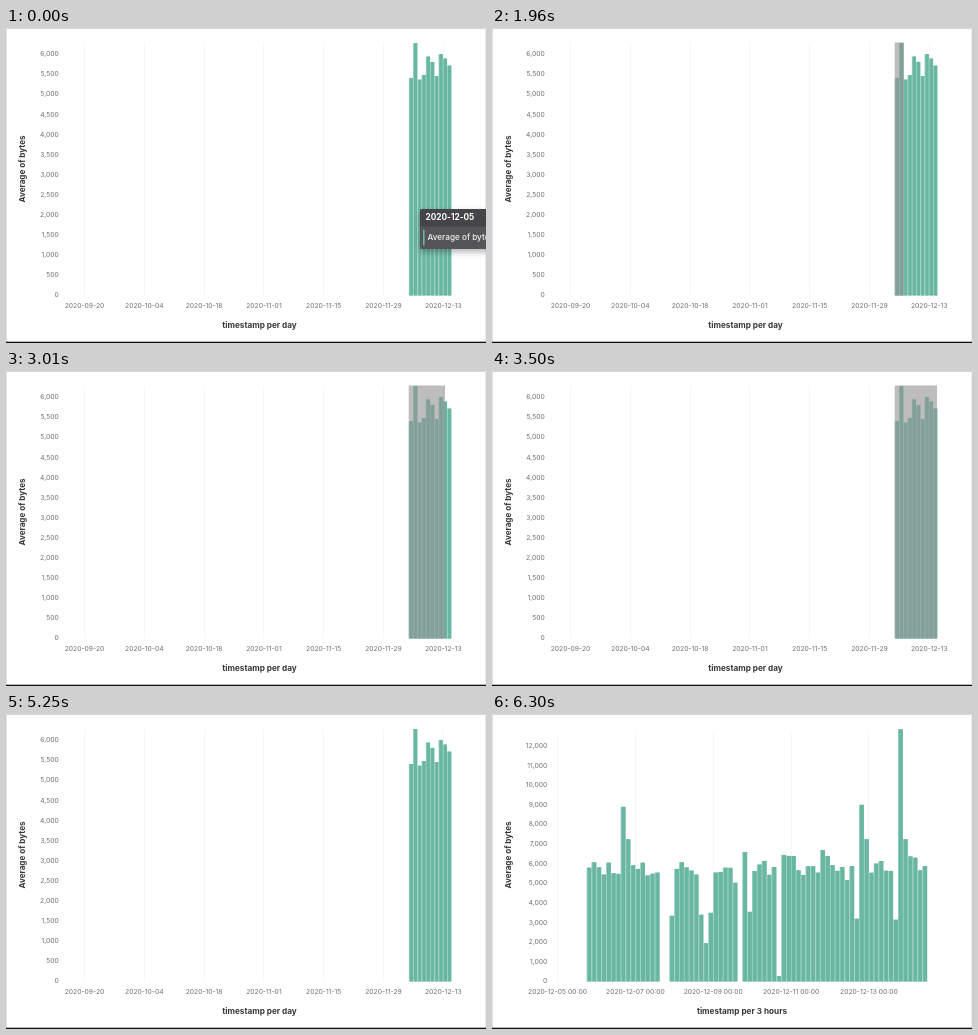
These frames come from a looping animation (480x315 px, 7.42 s). An HTML page with a canvas:

```html
<!DOCTYPE html>
<html lang="en">
<head>
<meta charset="utf-8">
<title>Zooming a bar chart</title>
<style>
html, body { margin: 0; width: 100%; height: 100%; overflow: hidden; background: #fff; }
canvas { display: block; width: 480px; height: 315px; }
</style>
</head>
<body>
<canvas id="chart"></canvas>
<script>
const W = 480, H = 315, LOOP = 7420, TICK = 70, BASE = 267.5;
const BRUSH_START = 1610, BRUSH_END = 5250, LOADING = 5810, ZOOM = 6090;
const FONT = 'Inter, "Open Sans", sans-serif';
const GREEN = '#6ab7a1', EDGE = '#98cfc0', LABEL = '#707070', TITLE = '#383838';

const canvas = document.getElementById('chart');
const ctx = canvas.getContext('2d');
const scale = window.devicePixelRatio || 1;
canvas.width = W * scale;
canvas.height = H * scale;
ctx.scale(scale, scale);

function seeded(seed) {
  return () => (seed = (seed * 16807) % 2147483647) / 2147483647;
}

function dates(from, days, count, suffix = '') {
  return Array.from({ length: count }, (_, i) => {
    const day = new Date(Date.parse(from) + i * days * 864e5);
    return day.toISOString().slice(0, 10) + suffix;
  });
}

// Traffic sags through each day of eight bars, apart from gaps, lulls and peaks.
function threeHourly() {
  const random = seeded(11);
  const events = {
    7: 8900, 15: 0, 16: 0, 17: 3350, 23: 3400, 24: 1950, 25: 3500, 31: 0,
    33: 3550, 39: 280, 55: 3200, 56: 9000, 63: 3150, 64: 12850
  };
  const values = [];
  for (let i = 0; i < 70; i++) {
    const usual = 6250 - 130 * (i % 8) + (random() - 0.5) * 900;
    const afterPeak = values[i - 1] > 8000;
    values.push(events[i] ?? (afterPeak ? 7250 : usual));
  }
  return values;
}

const daily = {
  title: 'timestamp per day', titleX: 253.5,
  left: 402.8, pitch: 4.25,
  values: [5410, 6280, 5370, 5485, 5945, 5810, 5460, 6005, 5895, 5720],
  ticks: dates('2020-09-20', 14, 7), tickX: 78.5, tickGap: 59.8, gridTop: 15,
  labelX: 52.7, stepY: 20.1, step: 500
};
const hourly = {
  title: 'timestamp per 3 hours', titleX: 250,
  left: 94.6, pitch: 4.865,
  values: threeHourly(),
  ticks: dates('2020-12-05', 2, 5, ' 00:00'), tickX: 65.5, tickGap: 77.85, gridTop: 19,
  labelX: 55.2, stepY: 19.63, step: 1000
};

// Right edge of the selection: [time, x]
const drag = [[1540, 403], [1820, 410], [2310, 420], [3010, 439], [3220, 444], [3640, 446], [4270, 447]];

function track(keys, t) {
  const i = keys.findIndex(key => t < key[0]);
  if (i < 0) return keys[keys.length - 1][1];
  const [t0, x0] = keys[i - 1], [t1, x1] = keys[i];
  return x0 + (x1 - x0) * (t - t0) / (t1 - t0);
}

function rect(x, y, w, h, color) {
  ctx.fillStyle = color;
  ctx.fillRect(x, y, w, h);
}

function panel(x, y, w, h, radii, color) {
  ctx.beginPath();
  ctx.roundRect(x, y, w, h, radii);
  ctx.fillStyle = color;
  ctx.fill();
}

function text(str, x, y, size, color, align = 'center', weight = 400) {
  ctx.font = `${weight} ${size}px ${FONT}`;
  ctx.textAlign = align;
  ctx.fillStyle = color;
  ctx.fillText(str, x, y + size * 0.36);
}

function drawChart(v) {
  v.ticks.forEach((label, i) => {
    const x = v.tickX + i * v.tickGap;
    rect(Math.round(x - 0.5), v.gridTop, 1, BASE - v.gridTop, '#f6f6f6');
    text(label, x, 278, 6.75, LABEL);
  });
  for (let i = 0; i <= 12; i++) {
    const label = (i * v.step).toLocaleString('en-US');
    text(label, v.labelX, 267 - i * v.stepY, 6.75, LABEL, 'right');
  }
  v.values.forEach((value, i) => {
    const x = v.left + i * v.pitch;
    const h = value / v.step * v.stepY;
    rect(x, BASE - h, v.pitch, h, EDGE);
    rect(x + 0.9, BASE - h, v.pitch - 0.9, h, GREEN);
  });
  text(v.title, v.titleX, 297, 8.2, TITLE, 'center', 700);
  ctx.save();
  ctx.translate(15.6, 141);
  ctx.rotate(-Math.PI / 2);
  text('Average of bytes', 0, 0, 8.1, TITLE, 'center', 700);
  ctx.restore();
}

function drawTooltip() {
  ctx.save();
  ctx.shadowColor = 'rgba(0,0,0,.3)';
  ctx.shadowBlur = 6 * scale;
  ctx.shadowOffsetY = 3 * scale;
  panel(414, 181, 90, 40, 2, '#555557');
  ctx.restore();
  panel(414, 181, 90, 17.5, [2, 2, 0, 0], '#454547');
  rect(417, 202, 1.6, 15.5, GREEN);
  text('2020-12-05', 419.5, 189.5, 8.25, '#fff', 'left', 700);
  text('Average of bytes', 421.5, 209.5, 8.2, '#f2f2f2', 'left', 500);
}

function drawFrame() {
  rect(0, 0, W, 1, '#d6d6d6');
  rect(0, 0, 1, H, '#e2e2e2');
  rect(W - 1, 0, 1, H, '#ececec');
  rect(0, 313.7, W, 1.3, '#111');
}

function draw(t) {
  rect(0, 0, W, H, '#fff');
  drawChart(t < ZOOM ? daily : hourly);
  if (t >= BRUSH_START && t < BRUSH_END) {
    const right = Math.floor(track(drag, t));
    rect(402.7, 14.5, right - 402.7, BASE - 14.5, 'rgba(145,145,145,.6)');
  }
  drawFrame();
  if (t < TICK) drawTooltip();
  if (t >= LOADING && t < ZOOM) {
    rect(0, 0, Math.min(23, 11.5 * (1 + (t - LOADING) / TICK)), 1.6, '#cf94bd');
  }
}

const start = performance.now();
function loop() {
  const t = (performance.now() - start) % LOOP;
  draw(Math.floor(t / TICK) * TICK);
  requestAnimationFrame(loop);
}
loop();
</script>
</body>
</html>
```
